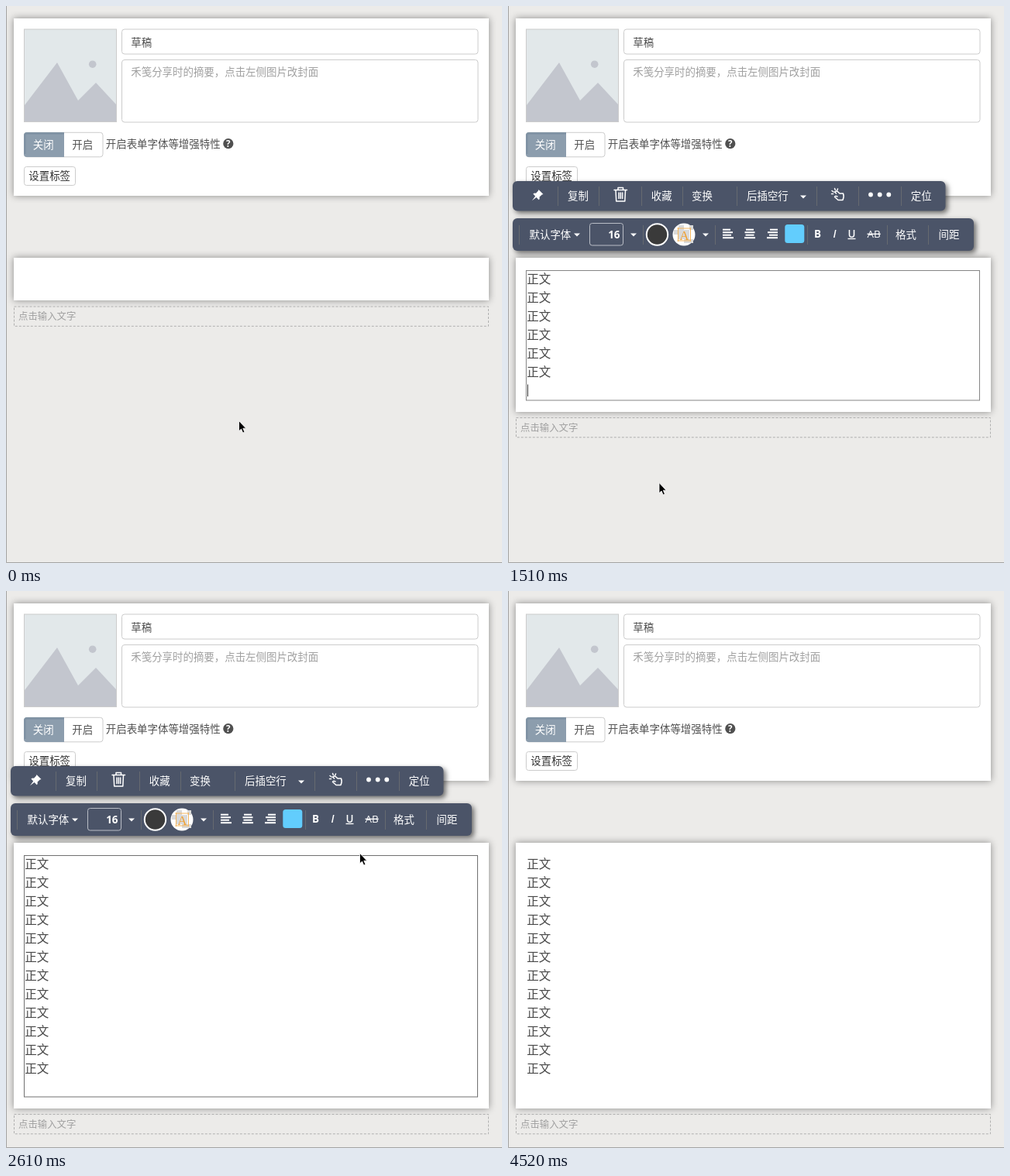
An HTML page for the animation above (4920 ms loop, 640 px wide and 719 px high).

```html
<!DOCTYPE html>
<html lang="zh-CN">
<head>
<meta charset="utf-8">
<title>编辑器</title>
<style>
html, body { margin: 0; width: 100%; height: 100%; overflow: hidden; background: #ecebe9; }
svg { display: block; width: 640px; height: 719px; }
text { font: 13.45px "Noto Sans CJK SC", "Noto Sans CJK", sans-serif; fill: #505050; white-space: pre; }
.panel { fill: #fff; filter: drop-shadow(0 0 5px rgba(0, 0, 0, .42)); }
.field { fill: #fff; stroke: #ccc; }
.hint { fill: #a0a0a0; }
.dash { fill: none; stroke: #b0b0b0; stroke-dasharray: 3 2; }
.small { font-size: 12.4px; }
.row { font-size: 15.5px; fill: #484848; }
.bar { fill: #4b5468; filter: drop-shadow(3px 3px 3px rgba(0, 0, 0, .55)); }
.tools text { fill: #fff; font-weight: 500; }
.tools .latin { font-family: "Open Sans", sans-serif; font-weight: 700; }
.icon { fill: #fff; }
.line { fill: none; stroke: #fff; stroke-width: 1.5; stroke-linecap: round; stroke-linejoin: round; }
</style>
</head>
<body>
<svg viewBox="0 0 640 719">
  <rect width="640" height="719" fill="#ecebe9"/>
  <path d="M.5 0V718.5H640" fill="none" stroke="#a3a3a3"/>

  <rect class="panel" x="10" y="16" width="613" height="229"/>
  <rect x="23.5" y="30" width="119" height="119.5" fill="#e2e8ea" stroke="#ccc"/>
  <path d="M24 128L66 73L93 122L116 99L142 127V149H24Z" fill="#c3c6ce"/>
  <circle cx="111.7" cy="75.2" r="4.8" fill="#c3c6ce"/>
  <rect class="field" x="149.5" y="30" width="459.5" height="32" rx="3.5"/>
  <rect class="field" x="149.5" y="69.5" width="459.5" height="80.5" rx="3.5"/>
  <text x="161.3" y="52">草稿</text>
  <text x="161.3" y="90.2" class="hint">禾笺分享时的摘要，点击左侧图片改封面</text>
  <rect class="field" x="23.5" y="163.3" width="101.5" height="31.5" rx="3.5"/>
  <path d="M75 163H27Q23 163 23 167V191Q23 195 27 195H75Z" fill="#8c9dad"/>
  <path d="M75 164.5H27Q24.5 164.5 24.5 167V191" fill="none" stroke="#76899b" stroke-width="2.5" opacity=".55"/>
  <text x="34.7" y="183.7" style="fill:#fff">关闭</text>
  <text x="85.3" y="183.7">开启</text>
  <text x="128.8" y="183">开启表单字体等增强特性</text>
  <circle cx="286.8" cy="177.7" r="6.6" fill="#505050"/>
  <text x="286.8" y="181.8" text-anchor="middle" style="font:700 11.5px 'Open Sans',sans-serif;fill:#fff">?</text>
  <rect class="field" x="23.5" y="207.5" width="66" height="24" rx="3"/>
  <text x="29.3" y="224.2" style="fill:#333">设置标签</text>

  <rect id="page" class="panel" x="10" y="325" width="613" height="55"/>
  <g id="foot">
    <rect class="dash" x="10.5" y="388" width="612" height="25.3"/>
    <text x="16" y="405" class="hint small">点击输入文字</text>
  </g>
  <rect id="hover" x="25.5" y="341.5" width="582" height="23" fill="none" stroke="#5fb3c6" stroke-dasharray="3 2"/>
  <rect id="box" x="23.5" y="341.5" width="585" height="24" fill="none" stroke="#858585"/>
  <g id="rows"></g>
  <rect id="caret" x="25" y="344.5" width="1" height="15.5" fill="#333"/>

  <g id="tools" class="tools">
    <rect class="bar" x="6" y="226" width="558.5" height="38.5" rx="6"/>
    <rect class="bar" x="6" y="274" width="595" height="42" rx="6"/>
    <g id="parts"></g>
    <path class="icon" d="M39.5 237L45.5 243L43.8 243.6L40.6 246.6Q41.2 249 39.8 250.2L36.6 247L31 251.3L35.2 245.6L32.4 242.6Q33.8 241.2 36 241.8L39 238.6Z"/>
    <path class="line" d="M137 237.5H153.500M142 237V234.500H148.500V237M139 238L139.700 252H150.800L151.500 238M143 241V248.500M145.300 241V248.500M147.600 241V248.500"/>
    <path class="line" d="M423.500 242L421.500 240L424.500 238.800L428 242H432.500Q434 246 432 250.500H426L421.500 246.500Q422 244.500 425 246M418 238.500L420 240M421.500 235.500L422.300 237.500M417.500 242.500H419.500M425.500 236L424.800 237.500"/>
    <g class="icon">
      <circle cx="468" cy="243.500" r="2.900"/><circle cx="479.700" cy="243.500" r="2.900"/><circle cx="491.300" cy="243.500" r="2.900"/>
    </g>
    <rect x="105.500" y="280.500" width="43" height="28.500" rx="3" fill="none" stroke="#b9bdc6"/>
    <text class="latin" x="144.500" y="300" text-anchor="end">16</text>
    <circle cx="192.500" cy="295" r="13.700" fill="#3a3a3a" stroke="#fff" stroke-width="2"/>
    <circle cx="227" cy="295" r="14.500" fill="#fff"/>
    <path d="M220 283H227V289H234V283H239V289H234V301H239V306H227V301H220V295H214V289H220Z" fill="#d9d9d9"/>
    <path d="M218.500 287H236M218.500 303H236M219.500 286V304M235.500 286V304" stroke="#f3b45c" fill="none"/>
    <text x="227.300" y="301.500" text-anchor="middle" style="font:17px 'Liberation Serif',serif;fill:#f0a030">A</text>
    <rect x="357.300" y="282" width="25" height="24" rx="3.500" fill="#62cdfd"/>
    <text class="latin" x="395" y="299.300">B</text>
    <text class="latin" x="419.500" y="299.300" style="font-style:italic;font-weight:600">I</text>
    <text class="latin" x="438.500" y="298.800" style="font-weight:600;text-decoration:underline">U</text>
    <text class="latin" x="463.500" y="299" style="font-weight:400;text-decoration:line-through">AB</text>
  </g>

  <path id="arrow" d="M.5 .5V13.800L3.500 11L5.700 16L7.900 15L5.800 10.200H9.700Z" fill="#000" stroke="#fff" stroke-width=".8"/>
  <path id="beam" d="M-5 -7.500H-1.500L0 -6.500L1.500 -7.500H5M0 -6.500V6.500M-5 7.500H-1.500L0 6.500L1.500 7.500H5" fill="none" stroke="#333" stroke-width="1.300"/>
</svg>
<script>
const LOOP = 4920, LINE = 24, MAX = 12;
const $ = id => document.getElementById(id);
const show = (id, on) => $(id).setAttribute('visibility', on ? 'visible' : 'hidden');

function add(parent, tag, attrs, text = '') {
  const el = document.createElementNS('http://www.w3.org/2000/svg', tag);
  for (const key in attrs) el.setAttribute(key, attrs[key]);
  el.textContent = text;
  return parent.appendChild(el);
}

// Toolbar labels, separators, drop-down marks and alignment icons
const parts = $('parts');
const label = (x, y, text) => add(parts, 'text', { x, y }, text);
const split = (x, y) => add(parts, 'path', { d: `M${x} ${y}v25`, stroke: '#666a70' });
const drop = (x, y) => add(parts, 'path', { class: 'icon', d: `M${x - 4} ${y}h8l-4 4z` });

[[77, '复制'], [184.800, '收藏'], [237, '变换'], [308, '后插空行'], [519.800, '定位']]
  .forEach(([x, s]) => label(x, 250, s));
[[27.500, '默认字体'], [500, '格式'], [555.500, '间距']].forEach(([x, s]) => label(x, 299.700, s));
[64.5, 117.5, 172.5, 225.5, 295.5, 398.5, 452.5, 507.5].forEach(x => split(x, 233));
[14.5, 174.5, 267.5, 386.5, 489.5, 542.5].forEach(x => split(x, 283));
drop(381, 244.5);
[89, 162, 255].forEach(x => drop(x, 293.5));

function align(x, widths, shift) {
  widths.forEach((w, i) => add(parts, 'rect', {
    class: 'icon', x: x + (14 - w) * shift, y: 287.7 + i * 3.5, width: w, height: 2
  }));
}
const ragged = [10, 13, 11, 14];
align(277, ragged, 0);
align(305, ragged, .5);
align(334, ragged, 1);
align(362.7, [14, 14, 14, 14], 0);

const rows = Array.from({ length: MAX }, (_, i) =>
  add($('rows'), 'text', { class: 'row', x: 24.3, y: 358.2 + i * LINE }, '正文'));

// Pointer samples: time, x, y, shape
const pointer = [
  [0, 300, 535, 'arrow'], [130, 280, 531, 'arrow'], [280, 157, 426, 'arrow'],
  [430, 120, 378, 'arrow'], [550, 100, 354, 'beam'], [670, 96, 352, 'beam'],
  [820, 95, 352.5, 'beam'], [970, 150, 500, 'arrow'], [1090, 194.5, 615, 'arrow'],
  [1800, 186, 612, 'arrow'], [1950, 205, 622, 'beam'], [2070, 212.5, 626.5, 'beam'],
  [2220, 300, 540, 'beam'], [2340, 390, 430, 'beam'], [2460, 440, 360, 'beam'],
  [2610, 456, 338, 'arrow'], [3170, 468, 338, 'arrow'], [3300, 473, 339, 'arrow'],
  [3450, 471.5, 341, 'arrow'], [3590, 462, 372, 'arrow'], [3710, 444, 420, 'arrow'],
  [3830, 427.5, 461, 'arrow'], [3950, 422, 488, 'arrow'], [4070, 415, 512, 'arrow'],
  [4220, 393, 572, 'arrow'], [4370, 371, 578, 'arrow'], [4520, 0, 0, '']
];
const typed = [[0, 0], [1380, 3], [1510, 6], [1950, 9], [2070, 12]];
const at = (list, t) => list.findLast(item => item[0] <= t);

function draw(t) {
  const [, x, y, shape] = at(pointer, t);
  for (const id of ['arrow', 'beam']) {
    show(id, id === shape);
    $(id).setAttribute('transform', `translate(${x} ${y})`);
  }
  const count = at(typed, t)[1], grow = count * LINE;
  const editing = t >= 970 && t < 3710;
  rows.forEach((row, i) => row.setAttribute('visibility', i < count ? 'visible' : 'hidden'));
  $('page').setAttribute('height', 55 + grow);
  $('box').setAttribute('height', LINE + grow - .5);
  $('box').setAttribute('stroke', t < 1950 ? '#858585' : '#707070');
  $('foot').setAttribute('transform', `translate(0 ${grow - (count ? .5 : 0)})`);
  $('caret').setAttribute('y', 344.5 + grow);
  show('caret', t >= 820 && t < 2610);
  show('hover', t >= 550 && t < 970);
  show('box', editing);
  show('tools', editing);
}

const start = performance.now();
function tick() {
  draw((performance.now() - start) % LOOP);
  requestAnimationFrame(tick);
}
tick();
</script>
</body>
</html>
```
